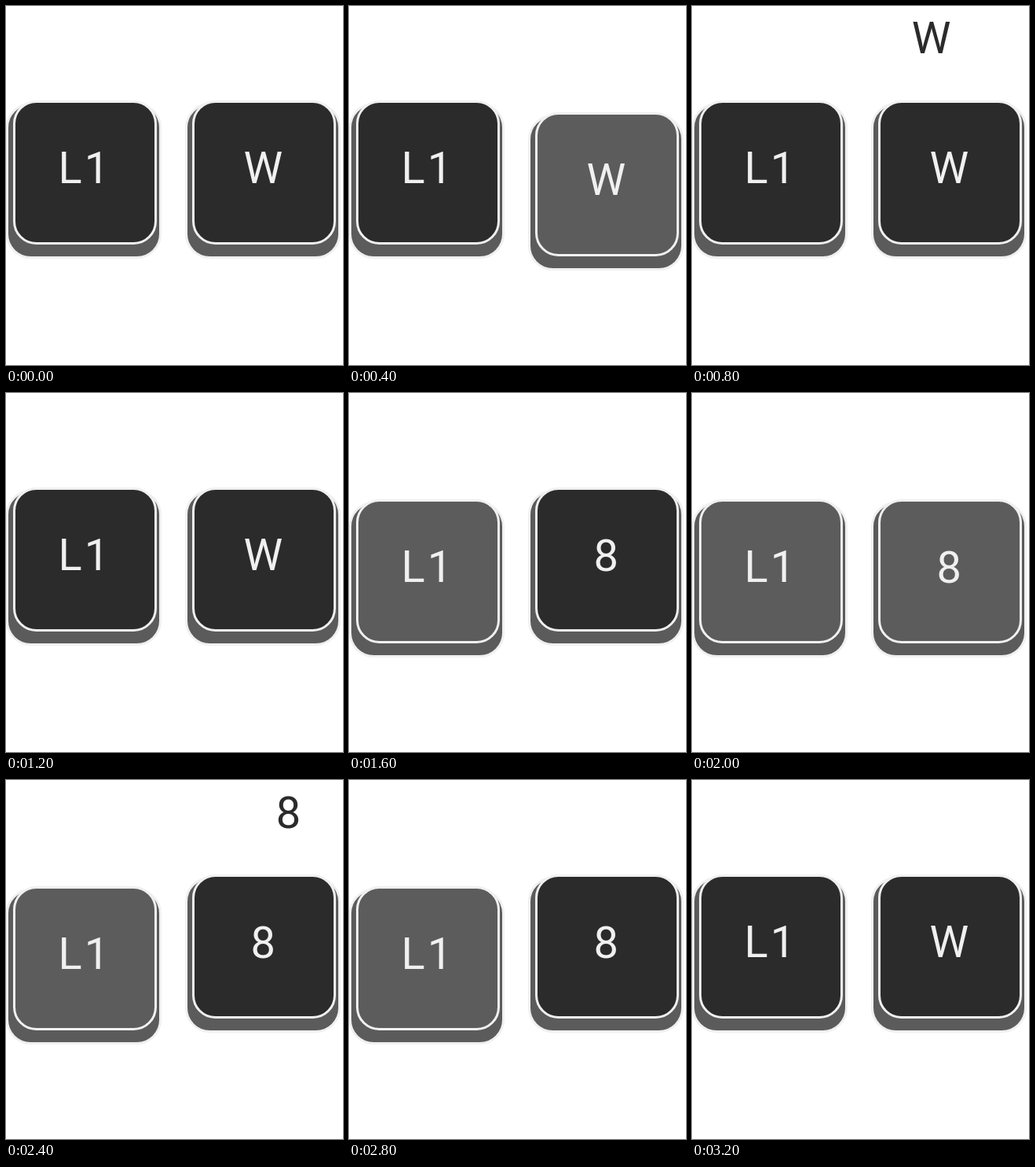
Write an HTML page that moves like this. It is 429 by 456 pixels and loops after 3600 ms.

```html
<!DOCTYPE html>
<html lang="en">
<head>
<meta charset="utf-8">
<title>Key combination</title>
<style>
  html, body { margin: 0; width: 100%; height: 100%; overflow: hidden; background: #fff; }
  svg { display: block; }
  text { font: 56px Roboto, "Liberation Sans", sans-serif; text-anchor: middle; }
  .base, .cap { stroke: #f0f0f0; stroke-width: 3; }
  .base { fill: #5b5b5b; }
  .cap { fill: #2b2b2b; }
  .down .cap { fill: #5c5c5c; }
  .label { fill: #f0f0f0; }
  .typed { fill: #2b2b2b; }
</style>
</head>
<body>
<svg width="429" height="456" viewBox="0 0 429 456">
  <defs>
    <g id="key">
      <rect class="base" x="1.5" y="124.5" width="195" height="195" rx="30"/>
    </g>
  </defs>
  <text id="typedW" class="typed" x="304.5" y="60.3">W</text>
  <text id="typed8" class="typed" x="359.5" y="60.8">8</text>
  <g id="layer">
    <rect class="base" x="1.5" y="124.5" width="195" height="195" rx="30"/>
    <rect class="cap" x="10.5" y="121.5" width="180" height="180" rx="28"/>
    <text class="label" x="81.5 115.5" y="225.4">L1</text>
  </g>
  <g id="letter">
    <rect class="base" x="229.5" y="124.5" width="195" height="195" rx="30"/>
    <rect class="cap" x="238.5" y="121.5" width="180" height="180" rx="28"/>
    <text id="label" class="label" x="327.3" y="225.4">W</text>
  </g>
</svg>
<script>
  const STEP = 400, TRAVEL = 15;
  // [layer key down, letter key down, label, typed character]
  const steps = [
    [0, 0, "W", ""],
    [0, 1, "W", ""],
    [0, 0, "W", "W"],
    [0, 0, "W", ""],
    [1, 0, "8", ""],
    [1, 1, "8", ""],
    [1, 0, "8", "8"],
    [1, 0, "8", ""],
    [0, 0, "W", ""]
  ];
  const el = id => document.getElementById(id);

  function press(key, down) {
    key.setAttribute("class", down ? "down" : "");
    key.setAttribute("transform", `translate(0 ${down ? TRAVEL : 0})`);
  }

  function draw(now) {
    const [layerDown, letterDown, label, typed] = steps[Math.floor(now / STEP) % steps.length];
    press(el("layer"), layerDown);
    press(el("letter"), letterDown);
    el("label").textContent = label;
    el("label").setAttribute("y", label === "8" ? 225.9 : 225.4);
    for (const c of "W8") el("typed" + c).style.display = typed === c ? "" : "none";
  }

  function loop() {
    draw(performance.now());
    requestAnimationFrame(loop);
  }
  loop();
</script>
</body>
</html>
```
